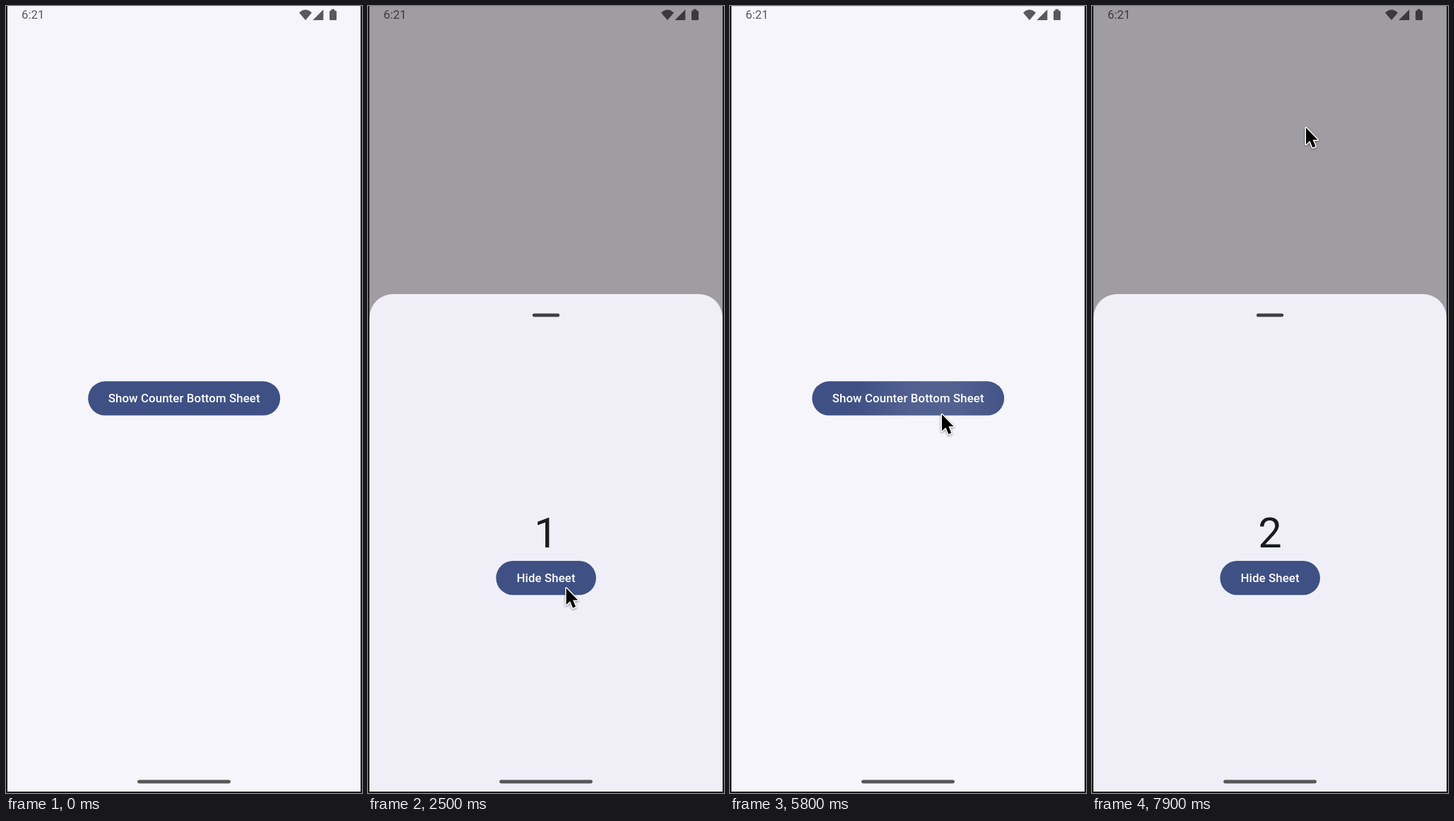
Recreate the animation shown at these times as an HTML page. Size 504 by 1112 pixels, loop 8 s.

```html
<!DOCTYPE html>
<html lang="en">
<head>
<meta charset="utf-8">
<title>Counter bottom sheet</title>
<style>
  html, body { margin: 0; width: 100%; height: 100%; overflow: hidden; background: #1c1c1f; }
  svg { display: block; width: 504px; height: 1112px; font-family: Roboto, sans-serif; }
  .label { font-size: 16.8px; font-weight: 500; letter-spacing: .12px; fill: #fff; text-anchor: middle; }
  .status { fill: #59595d; }
  #cursor { filter: drop-shadow(0 1.5px 1.5px rgba(0, 0, 0, .45)); }
</style>
</head>
<body>
<svg viewBox="0 0 504 1112">
  <defs>
    <clipPath id="screen"><rect x="2" width="500" height="1110"/></clipPath>
    <clipPath id="showShape"><rect x="116.2" y="530.3" width="272" height="48.2" rx="24.1"/></clipPath>
    <clipPath id="hideShape"><rect x="181.3" y="377" width="141.6" height="48.3" rx="24.15"/></clipPath>
    <radialGradient id="glow">
      <stop offset=".3" stop-color="#fff" stop-opacity=".1"/>
      <stop offset="1" stop-color="#fff" stop-opacity="0"/>
    </radialGradient>
  </defs>
  <g clip-path="url(#screen)">
    <rect width="504" height="1112" fill="#f5f5fb"/>
    <g class="status">
      <text x="22" y="18.4" font-size="16.8">6:21</text>
      <path d="M415 9.5Q424 1 433 9.5L424 20ZM449.3 5V20H434.3ZM460.5 6.5V4.6H465V6.5H466.5Q468 6.5 468 8V18.5Q468 20 466.5 20H459.5Q458 20 458 18.5V8Q458 6.5 459.5 6.5Z"/>
    </g>
    <g clip-path="url(#showShape)">
      <rect x="116" y="530" width="273" height="49" fill="#3f5084"/>
      <circle id="showRipple" cx="290" cy="564" fill="url(#glow)"/>
    </g>
    <text class="label" x="252.2" y="560.3">Show Counter Bottom Sheet</text>

    <g id="dialog">
      <rect width="504" height="1112" opacity=".36" fill="#060004"/>
      <g id="sheet">
        <rect x="2" width="500" height="1200" rx="33.6" fill="#f0eff8"/>
        <rect x="232.8" y="27.4" width="38.4" height="4.9" rx="2.4" fill="#403e46"/>
        <text id="count" x="252" y="357.8" font-size="59.5" text-anchor="middle" fill="#1a1b20"></text>
        <g clip-path="url(#hideShape)">
          <rect x="181" y="377" width="143" height="49" fill="#3f5084"/>
          <circle id="hideRipple" cx="258" cy="418" fill="url(#glow)"/>
        </g>
        <text class="label" x="252.1" y="407">Hide Sheet</text>
      </g>
    </g>
    <rect id="topLine" width="504" height="1" fill="#88888c" opacity=".25"/>
    <rect x="186" y="1093.5" width="132" height="4.9" rx="2.4" fill="#575659"/>
    <path id="cursor" d="M0 0V23.5L5.4 18.5L9.4 28L13.4 26.3L9.5 17H16.5Z"
      stroke="#fff" stroke-width="3" stroke-linejoin="round" paint-order="stroke"/>
  </g>
</svg>
<script>
const LOOP = 8000, STEP = 100, SHEET_TOP = 407;
const el = id => document.getElementById(id);
const ramp = (t, start, length) => Math.min(1, Math.max(0, (t - start) / length));
const smooth = p => p * p * (3 - 2 * p);

// The pointer rests between eased hops.
const entry = { x: 439, y: 9 };
const hops = [
  { from: 100, to: 200, x: 121, y: 656 },
  { from: 300, to: 900, x: 287.5, y: 545.5 },
  { from: 1600, to: 2100, x: 294, y: 818 },
  { from: 2200, to: 2900, x: 255, y: 822 },
  { from: 4900, to: 5500, x: 298, y: 574 },
  { from: 6000, to: 6800, x: 303, y: 63 },
  { from: 6800, to: 7200, x: 299, y: 157 },
  { from: 7400, to: 7900, x: 301, y: 169 }
];

// The first opening fades in late, after its slide has begun.
const firstOpening = { slide: 1300, fade: 1432, count: 1400 };
const secondOpening = { slide: 5900, fade: 5800, count: 5900 };
const CLOSE = 4420;

function pointer(t) {
  return hops.reduce((at, hop) => {
    const p = smooth(ramp(t, hop.from, hop.to - hop.from));
    return { x: at.x + (hop.x - at.x) * p, y: at.y + (hop.y - at.y) * p };
  }, entry);
}

function dialog(t) {
  const isFirst = t < 5000;
  const opening = isFirst ? firstOpening : secondOpening;
  const closed = isFirst ? smooth(ramp(t, CLOSE, 380)) : 0;
  const shown = 1 - (1 - ramp(t, opening.fade, 210)) ** 1.5;
  return {
    opacity: shown * (1 - closed),
    top: SHEET_TOP + 236 * Math.exp((opening.slide - t) / 70) - 11 * closed,
    count: Math.max(0, Math.floor((t - opening.count) / 1000))
  };
}

function ripple(id, age, life, speed) {
  el(id).setAttribute('r', age >= 0 && age < life ? 30 + age * speed : 0);
}

function show(id, visible) {
  el(id).style.visibility = visible ? 'visible' : 'hidden';
}

function draw(now) {
  const t = Math.floor(now % LOOP / STEP) * STEP;
  const { opacity, top, count } = dialog(t);
  const { x, y } = pointer(t);

  el('dialog').setAttribute('opacity', opacity);
  el('sheet').setAttribute('transform', `translate(0 ${top})`);
  el('count').textContent = count;
  el('cursor').setAttribute('transform', `translate(${x + 2} ${y + 3})`);
  show('cursor', t >= 100);
  show('topLine', t >= 1000);

  ripple('showRipple', t - (t < 3000 ? 1200 : 5700), 300, .85);
  ripple('hideRipple', t - 4400, 400, .2);
  requestAnimationFrame(draw);
}
requestAnimationFrame(draw);
</script>
</body>
</html>
```
